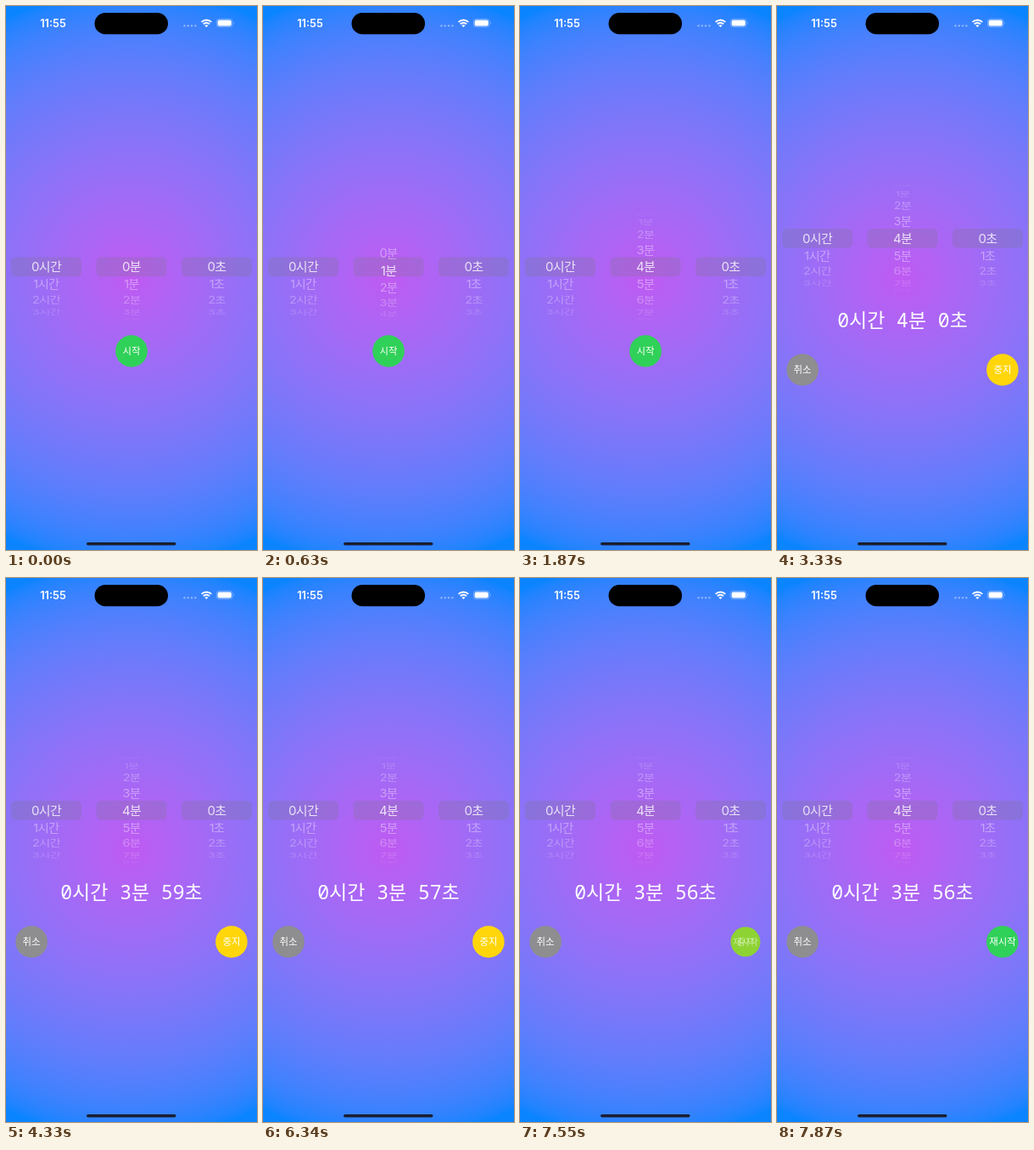
Recreate the animation shown at these times as an HTML page. Size 296 by 640 pixels, loop 8 s.

```html
<!DOCTYPE html>
<html lang="ko">
<head>
<meta charset="utf-8">
<style>
  html, body { margin: 0; width: 100%; height: 100%; overflow: hidden; background: #0a84ff; }
  svg {
    display: block; width: 296px; height: 640px;
    background: radial-gradient(circle 339px at 148px 320px in oklab, #bf5af2, #0a84ff);
  }
  text { fill: #fff; text-anchor: middle; font-family: Inter, "Noto Sans CJK KR", "Noto Sans CJK", sans-serif; }
  .row { font-size: 15px; letter-spacing: -.7px; }
  .label { font-size: 11.4px; }
  .clock { font-size: 12.8px; font-weight: 600; }
  #time { font: 300 23px "Noto Sans Mono", "Noto Sans CJK KR", "Noto Sans CJK", monospace; white-space: pre; }
</style>
</head>
<body>
<svg viewBox="0 0 296 640">
  <!-- status bar -->
  <text class="clock" x="55.5" y="24.8">11:55</text>
  <rect x="104.5" y="8" width="86.5" height="25.3" rx="12.6"/>
  <g fill="#fff" fill-opacity=".4">
    <circle cx="210.5" cy="23.3" r="1.2"/><circle cx="214.8" cy="23.3" r="1.2"/>
    <circle cx="219" cy="23.3" r="1.2"/><circle cx="223.3" cy="23.3" r="1.2"/>
  </g>
  <g fill="none" stroke="#fff" stroke-width="2">
    <path d="M230.6 18.9a8.2 8.2 0 0 1 11.6 0M232.8 21.2a5 5 0 0 1 7.2 0"/>
    <path d="M236.4 25l-2-2.1a2.9 2.9 0 0 1 4 0z" fill="#fff" stroke="none"/>
  </g>
  <rect x="248.3" y="15.3" width="18.8" height="9.4" rx="3" fill="none" stroke="#fff" stroke-opacity=".4" stroke-width=".8"/>
  <rect x="249.6" y="16.6" width="16.2" height="6.8" rx="1.9" fill="#fff"/>
  <path d="M268.2 18.4q1.4 1.6 0 3.2z" fill="#fff" fill-opacity=".45"/>

  <g id="picker"></g>

  <g id="start" transform="translate(148 406)">
    <circle r="18.8" fill="#30d158"/><text class="label" y="4">시작</text>
  </g>
  <g id="running">
    <text id="time" x="148" y="378"></text>
    <g transform="translate(30.1 428)">
      <circle r="18.8" fill="#8e8e90"/><text class="label" y="4">취소</text>
    </g>
    <g id="toggle">
      <circle r="18.8"/>
      <text class="label" y="4">중지</text>
      <text class="label" y="4">재시작</text>
    </g>
  </g>
  <rect x="95" y="631" width="105.5" height="3.6" rx="1.8" fill="#1a1e30"/>
</svg>

<script>
const LOOP = 8000, HOLD = 108, RADIUS = 64, STEP = 18.5 * Math.PI / 180;
const $ = id => document.getElementById(id);
const clamp = x => Math.min(1, Math.max(0, x));
const smooth = x => x * x * (3 - 2 * x);
const span = (t, a, b) => clamp((t - a) / (b - a));
const mix = (a, b, k) => a + (b - a) * k;
// time that advances in visible steps, counted from a
const held = (t, a) => a + Math.floor((t - a) / HOLD) * HOLD;

function add(parent, tag, attrs, text = '') {
  const el = document.createElementNS('http://www.w3.org/2000/svg', tag);
  for (const k in attrs) el.setAttribute(k, attrs[k]);
  el.textContent = text;
  return parent.appendChild(el);
}

// three wheels, with y = 0 at the selected row
const wheels = [[47.5, '시간', 4], [148, '분', 9], [248.5, '초', 4]].map(([x, unit, count]) => {
  const g = add($('picker'), 'g', { transform: `translate(${x} 0)` });
  add(g, 'rect', { x: -41.5, y: -11.5, width: 83, height: 22.8, rx: 5.5, fill: 'rgba(118,118,128,.24)' });
  return Array.from({ length: count }, (_, i) => add(g, 'text', { class: 'row', y: 5.4 }, i + unit));
});

function turn(rows, pos) {
  rows.forEach((row, i) => {
    const d = i - pos, far = Math.abs(d), angle = d * STEP;
    const c = far < 4.3 ? Math.cos(angle) : 0;
    const chosen = far < .5, size = chosen ? 1 : .96;
    row.setAttribute('transform', `translate(0 ${RADIUS * Math.sin(angle)}) scale(${size} ${size * c})`);
    row.setAttribute('opacity', chosen ? .8 : .42 * c ** 1.5);
  });
}

function minutes(t) {
  if (t < 510) return 0;
  if (t < 1140) return 1.2 * smooth(span(held(t, 510), 450, 726));
  if (t < 1540) return 1.24;
  return mix(1.24, 4, smooth(span(held(t, 1540), 1450, 1864)));
}

function remaining(t) {
  const left = 240 - Math.floor((t - 3330) / 1000);
  return `0시간 ${Math.floor(left / 60)}분 ${left % 60}초`;
}

const [disc, pauseLabel, resumeLabel] = $('toggle').children;

function draw(t) {
  const running = t >= 3330;
  $('picker').setAttribute('transform', `translate(0 ${running ? 273.4 : 307})`);
  wheels.forEach((rows, i) => turn(rows, i === 1 ? minutes(t) : 0));
  $('start').style.display = running ? 'none' : '';
  $('running').style.display = running ? '' : 'none';
  if (!running) return;

  $('time').textContent = remaining(t);
  const tap = held(t, 7330);
  const k = smooth(span(tap, 7350, 7720));
  const press = 1 - .07 * Math.sin(Math.PI * span(tap, 7330, 7762));
  $('toggle').setAttribute('transform', `translate(265.9 428) scale(${press})`);
  disc.setAttribute('fill', `rgb(${mix(255, 48, k)},${mix(214, 209, k)},${mix(10, 88, k)})`);
  pauseLabel.setAttribute('opacity', 1 - k);
  resumeLabel.setAttribute('opacity', k);
}

const begin = performance.now();
function tick() {
  draw((performance.now() - begin) % LOOP);
  requestAnimationFrame(tick);
}
tick();
</script>
</body>
</html>
```
